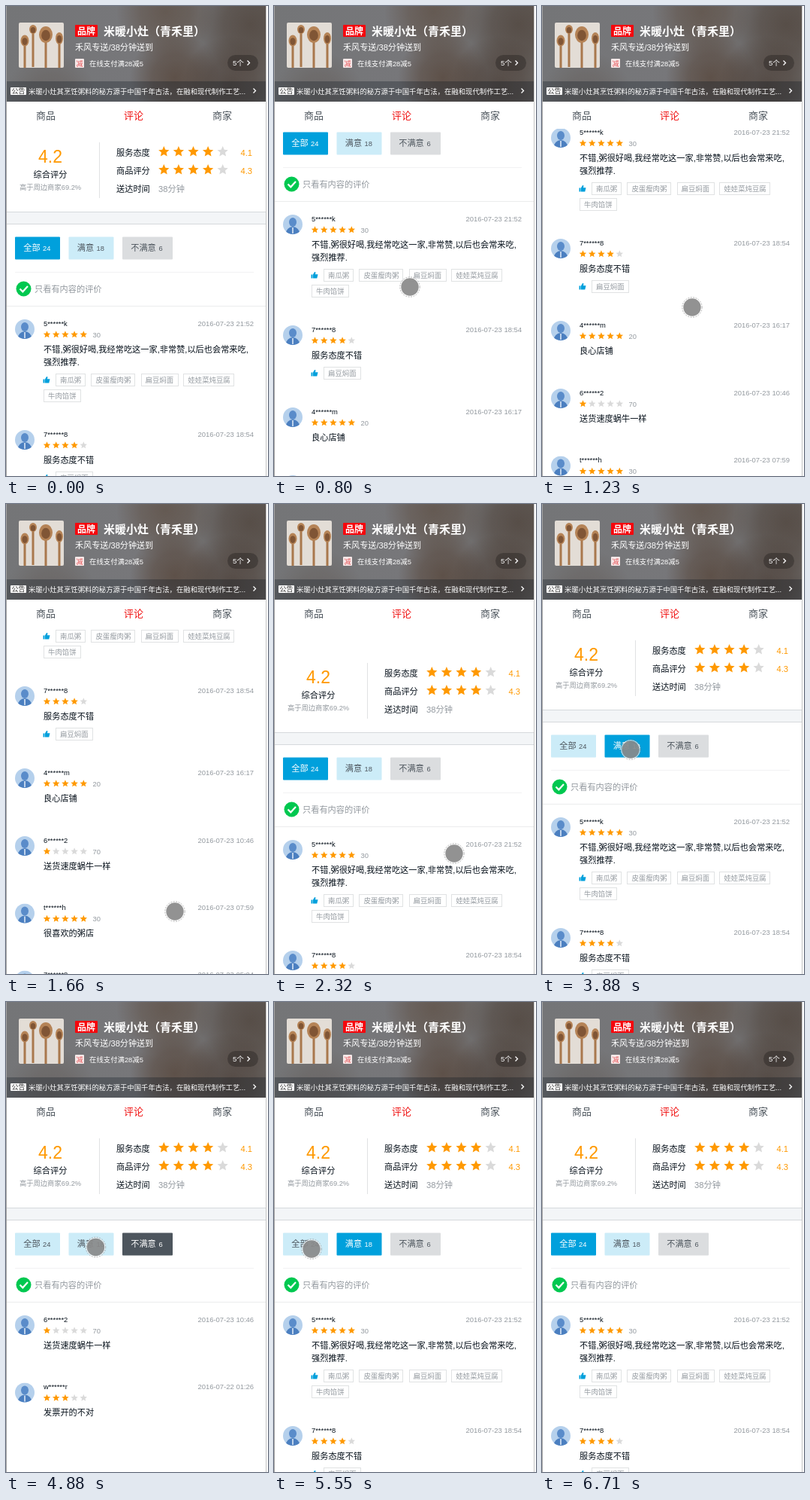
Animation of 349 by 624 pixels, one loop 6810 ms. Source, as an HTML page with a canvas:

```html
<!DOCTYPE html>
<html lang="zh-CN">
<head>
<meta charset="utf-8">
<style>
html, body { margin: 0; width: 100%; height: 100%; overflow: hidden; background: #fff }
canvas { display: block }
</style>
</head>
<body>
<canvas id="stage" width="349" height="624"></canvas>
<script>
const c = document.getElementById('stage').getContext('2d');
const LOOP = 6810, LEFT = 1, RIGHT = 346, TOP = 163;
const FONT = '"Liberation Sans","Noto Sans CJK SC","Noto Sans CJK",sans-serif';
const DARK = '#07111b', GREY = '#93999f', SLATE = '#4d555d', BLUE = '#00a0dc', ORANGE = '#ff9900';
const LINE = 'rgba(7,17,27,.12)';

// [first, last, count]: the screen refreshes at these evenly spaced times
const refreshes = [[0, 0, 1], [140, 800, 6], [920, 1080, 2], [1230, 1660, 4], [1780, 2200, 4],
  [2320, 2320, 1], [2600, 3050, 4], [3170, 3290, 2], [3600, 3600, 1], [3880, 4140, 3],
  [4450, 4880, 4], [5040, 5430, 3], [5550, 5550, 1], [5960, 6340, 4], [6710, 6710, 1]]
  .flatMap(([a, b, n]) => Array.from({ length: n }, (_, i) => n > 1 ? a + (b - a) * i / (n - 1) : a));

const scrollKeys = [[140, 0], [800, 139], [1080, 230], [1660, 321], [1930, 260], [2200, 40],
  [2320, -30], [2600, -30], [3050, -1], [3290, 0]];
const touchKeys = [[140, 176, 500], [800, 181, 373], [1080, 186, 320], [1230, 200, 400],
  [1660, 225, 541], [1930, 228, 400], [2320, 240, 464], [2600, 240, 464], [3050, 159, 343],
  [3290, 118, 326], [3880, 118, 326], [4140, 190, 326], [4450, 190, 326], [4880, 119.5, 325.5],
  [5430, 112, 328], [5550, 50, 328], [5960, 50, 328], [6210, 331, 610]];

const reviews = [
  { name: '5******k', date: '2016-07-23 21:52', stars: 5, time: 30,
    text: ['不错,粥很好喝,我经常吃这一家,非常赞,以后也会常来吃,', '强烈推荐.'],
    tags: ['南瓜粥', '皮蛋瘦肉粥', '扁豆焖面', '娃娃菜炖豆腐', '牛肉馅饼'], height: 147 },
  { name: '7******8', date: '2016-07-23 18:54', stars: 4, text: ['服务态度不错'], tags: ['扁豆焖面'], height: 109 },
  { name: '4******m', date: '2016-07-23 16:17', stars: 5, time: 20, text: ['良心店铺'], height: 90 },
  { name: '6******2', date: '2016-07-23 10:46', stars: 1, time: 70, text: ['送货速度蜗牛一样'], bad: true, height: 89.5 },
  { name: 't******h', date: '2016-07-23 07:59', stars: 5, time: 30, text: ['很喜欢的粥店'], height: 89 },
  { name: '7******8', date: '2016-07-23 05:04', stars: 4, text: ['味道还不错'], height: 90 },
  { name: 'w******r', date: '2016-07-22 01:26', stars: 3, text: ['发票开的不对'], bad: true, height: 90 }
];

function track(keys, t) {
  if (t <= keys[0][0]) return keys[0].slice(1);
  const i = keys.findIndex(k => k[0] > t);
  if (i < 0) return keys[keys.length - 1].slice(1);
  const a = keys[i - 1], b = keys[i], p = (t - a[0]) / (b[0] - a[0]);
  return a.slice(1).map((v, j) => v + (b[j + 1] - v) * p);
}

function text(str, x, y, size, color, align = 'left', weight = 400) {
  c.font = `${weight} ${size}px ${FONT}`;
  c.textAlign = align;
  c.fillStyle = color;
  c.fillText(str, x, y);
}

function rect(x, y, w, h, color, r = 0) {
  c.fillStyle = color;
  c.beginPath();
  c.roundRect(x, y, w, h, r);
  c.fill();
}

function disc(x, y, rx, color, ry = rx) {
  c.fillStyle = color;
  c.beginPath();
  c.ellipse(x, y, rx, ry, 0, 0, 7);
  c.fill();
}

function stroke(points, color, width) {
  c.strokeStyle = color;
  c.lineWidth = width;
  c.beginPath();
  points.forEach(([x, y]) => c.lineTo(x, y));
  c.stroke();
}

const chevron = (x, y) => stroke([[x - 1.5, y - 3], [x + 1.5, y], [x - 1.5, y + 3]], '#fff', 1.3);

function clipped(x, y, w, h, r, draw) {
  c.save();
  c.beginPath();
  c.roundRect(x, y, w, h, r);
  c.clip();
  draw();
  c.restore();
}

function stars(x, y, gap, r, score) {
  for (let n = 0; n < 5; n++) {
    c.fillStyle = n < score ? ORANGE : '#dadada';
    c.beginPath();
    for (let k = 0; k < 10; k++) {
      const a = k * Math.PI / 5, q = k % 2 ? r * .46 : r;
      c.lineTo(x + n * gap + q * Math.sin(a), y - q * Math.cos(a));
    }
    c.fill();
  }
}

function glow(x, y, r, rgb, alpha) {
  const g = c.createRadialGradient(x, y, 0, x, y, r);
  g.addColorStop(0, `rgba(${rgb},${alpha})`);
  g.addColorStop(.5, `rgba(${rgb},${alpha * .7})`);
  g.addColorStop(1, `rgba(${rgb},0)`);
  c.fillStyle = g;
  c.fillRect(0, 0, 349, 127);
}

function backdrop() {
  const g = c.createLinearGradient(0, 0, 349, 0);
  g.addColorStop(0, '#747577');
  g.addColorStop(.5, '#77777a');
  g.addColorStop(1, '#6b6866');
  c.fillStyle = g;
  c.fillRect(0, 0, 349, 127);
  glow(212, 8, 65, '92,76,64', .65);
  glow(325, 25, 70, '78,66,58', .7);
  glow(225, 95, 60, '84,66,54', .7);
  glow(300, 105, 65, '72,58,50', .65);
  glow(60, 120, 60, '90,78,70', .35);
}

function spoons() {
  rect(17, 22, 60, 60, '#e3ddd6');
  for (const [x, y, rx, ry] of [[25, 46, 5.5, 7.5], [36, 31, 5, 6], [53, 38, 9, 11], [71, 43, 5, 8]]) {
    rect(x - 1.5, y, 3, 50, '#a9784d');
    disc(x, y, rx, '#b58356', ry);
    disc(x, y + 1, rx * .65, '#805535', ry * .65);
  }
}

function header() {
  clipped(LEFT, 0, RIGHT - LEFT, 127, 0, backdrop);
  clipped(17, 22, 60, 60, 2, spoons);
  rect(92, 25, 30, 16, '#f5060c', 1);
  text('品牌', 107, 37.5, 12, '#fff', 'center', 700);
  text('米暖小灶（青禾里）', 130, 38.5, 15, '#fff', 'left', 700);
  text('禾风专送/38分钟送到', 92, 59, 11.1, '#fff');
  rect(92, 70, 12, 12, '#f7e9e9', 1);
  text('减', 98, 79.5, 9, '#e5565a', 'center');
  text('在线支付满28减5', 111, 80, 9.4, '#fff', 'left', 500);
  rect(295, 65, 41, 21, 'rgba(0,0,0,.25)', 10.5);
  text('5个', 302, 79, 9.6, '#fff', 'left', 500);
  chevron(323, 75.5);
  rect(LEFT, 100, RIGHT - LEFT, 27, 'rgba(7,17,27,.28)');
  rect(6, 108, 21, 10, '#fff', 1);
  text('公告', 16.5, 116.3, 9, '#333', 'center', 500);
  text('米暖小灶其烹饪粥料的秘方源于中国千年古法，在融和现代制作工艺...', 30, 116.5, 9.4, '#fff', 'left', 500);
  chevron(331, 112.5);
  text('商品', 53, 150, 13, SLATE, 'center');
  text('评论', 170, 150, 13, '#f01414', 'center');
  text('商家', 288, 150, 13, SLATE, 'center');
}

function overview() {
  text('4.2', 59, 208, 23, ORANGE, 'center');
  text('综合评分', 59, 228, 11.2, DARK, 'center');
  text('高于周边商家69.2%', 59, 243.5, 9.3, GREY, 'center');
  rect(124, 181, 1, 74, LINE);
  [['服务态度', '4.1'], ['商品评分', '4.3']].forEach(([label, score], i) => {
    const y = 198 + i * 24;
    text(label, 147, y + .5, 11.2, DARK);
    stars(210.3, y - 4.5, 19.6, 7.5, 4);
    text(score, 312.5, y + .5, 11.2, ORANGE);
  });
  text('送达时间', 147, 246.5, 11.2, DARK);
  text('38分钟', 203, 246.5, 11.2, GREY);
  rect(LEFT, 273, RIGHT - LEFT, 17, '#f3f5f7');
  rect(LEFT, 273, RIGHT - LEFT, 1, LINE);
  rect(LEFT, 289, RIGHT - LEFT, 1, LINE);
}

function filters(active) {
  [['all', '全部', 24, 12, 60], ['good', '满意', 18, 83.5, 60], ['bad', '不满意', 6, 155, 67]]
    .forEach(([id, label, count, x, w]) => {
      const on = id === active, bad = id === 'bad', color = on ? '#fff' : SLATE, weight = on ? 500 : 400;
      rect(x, 306.5, w, 30, on ? (bad ? SLATE : BLUE) : (bad ? '#dbdddf' : '#ccecf8'), 1);
      text(label, x + 11.2, 325, 11.2, color, 'left', weight);
      text(count, x + w - 13.5 - (count > 9 ? 9.5 : 5), 324.7, 9.3, color, 'left', weight);
    });
  rect(12, 353, 318, 1, 'rgba(7,17,27,.05)');
  disc(23.5, 375.5, 10, '#00c850');
  stroke([[18.5, 375.5], [22.3, 379.3], [29, 372]], '#fff', 2.2);
  text('只看有内容的评价', 38, 379.7, 11.2, GREY);
  rect(LEFT, 398, RIGHT - LEFT, 1, 'rgba(7,17,27,.08)');
}

function avatar(x, y) {
  clipped(x - 13, y - 13, 26, 26, 13, () => {
    rect(x - 13, y - 13, 26, 26, '#b5d0ec');
    disc(x, y + 13, 9.5, '#4b7fc0', 10);
    disc(x, y - 3, 5, '#5a8cca', 6);
    stroke([[x, y + 4], [x, y + 12]], '#dbe8f6', 1.6);
  });
}

function thumb(x, y) {
  rect(x - 4.5, y - 1, 2, 5, BLUE);
  c.beginPath();
  [[-2, -1], [0, -4.5], [1.5, -4], [1, -1.2], [4.5, -1.2], [3.3, 4], [-2, 4]]
    .forEach(([dx, dy]) => c.lineTo(x + dx, y + dy));
  c.fill();
}

function tags(list, y) {
  let x = 66;
  thumb(54, y + 8.5);
  for (const tag of list) {
    const w = tag.length * 9.4 + 12;
    if (x + w > 330) {
      x = 50;
      y += 21;
    }
    c.strokeStyle = LINE;
    c.lineWidth = 1;
    c.strokeRect(Math.round(x) + .5, y + .5, Math.round(w) - 1, 16);
    text(tag, x + 6, y + 12, 9.4, GREY);
    x += w + 7.2;
  }
}

function review(r, y) {
  avatar(25, y + 8);
  text(r.name, 50, y + 3.5, 9.4, DARK);
  text(r.date, 330, y + 3.5, 9.45, GREY, 'right');
  stars(54.5, y + 15.3, 12.2, 5, r.stars);
  if (r.time) text(r.time, 115.5, y + 18.8, 9.4, GREY);
  r.text.forEach((line, i) => text(line, 50, y + 38.8 + i * 16.7, 11.2, DARK));
  if (r.tags) tags(r.tags, Math.round(y + 33.5 + r.text.length * 16.7));
}

function touch(x, y) {
  disc(x, y, 13, 'rgba(255,255,255,.65)');
  disc(x, y, 11.7, 'rgba(115,115,115,.78)');
  c.setLineDash([2, 1.5]);
  c.strokeStyle = 'rgba(110,110,110,.65)';
  c.lineWidth = .8;
  c.beginPath();
  c.arc(x, y, 13.2, 0, 7);
  c.stroke();
  c.setLineDash([]);
}

function filterAt(t) {
  if (t < 3600 || t >= 5960) return 'all';
  return t >= 4450 && t < 5200 ? 'bad' : 'good';
}

function draw(now) {
  const elapsed = now % LOOP;
  const t = refreshes.filter(v => v <= elapsed).pop();
  const active = filterAt(t);
  rect(0, 0, 349, 624, '#fff');
  header();
  clipped(LEFT, TOP, RIGHT - LEFT, 624 - TOP, 0, () => {
    c.translate(0, -Math.round(track(scrollKeys, t)[0]));
    overview();
    filters(active);
    let y = 421;
    for (const r of reviews) {
      if (active !== 'all' && (active === 'bad') !== !!r.bad) continue;
      review(r, y);
      y += r.height;
    }
  });
  rect(0, 0, 1, 624, '#a2a2a2');
  rect(RIGHT, 0, 1, 624, '#c4c4c4');
  if (t >= 140 && t < 6340) touch(...track(touchKeys, t));
}

const start = performance.now();
function tick() {
  draw(performance.now() - start);
  requestAnimationFrame(tick);
}
tick();
</script>
</body>
</html>
```
